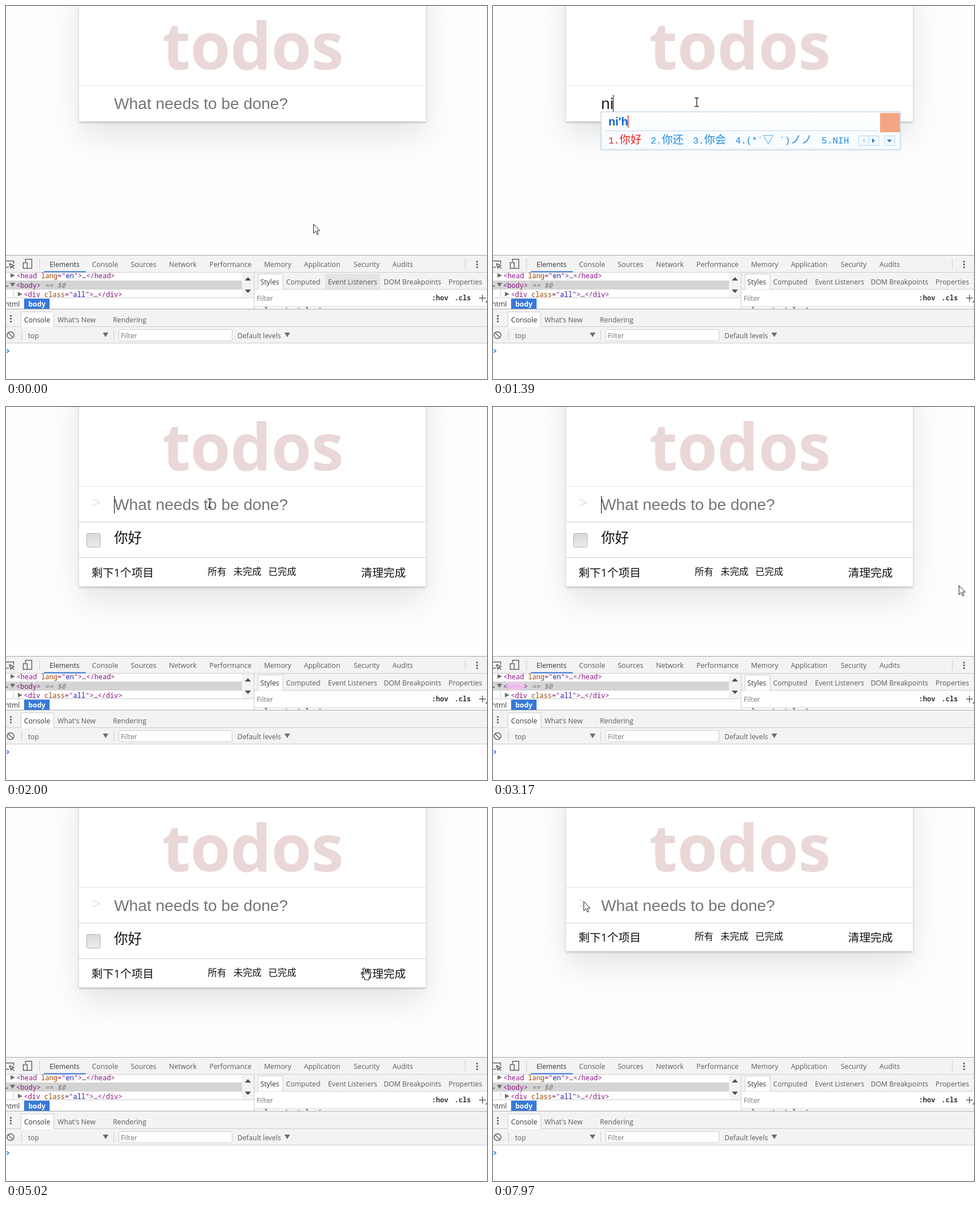
An HTML page for the animation above (8000 ms loop, 850 by 659 pixels).

```html
<!DOCTYPE html>
<html lang="en">
<head>
<meta charset="utf-8">
<title>todos</title>
<style>
  html, body { margin: 0; width: 850px; height: 659px; overflow: hidden; background: #fefefe; }
  svg { position: absolute; left: 0; top: 0; }
  text { white-space: pre; }
  .card {
    position: absolute; left: 129px; top: -60px; width: 613px; background: #fff;
    box-shadow: 0 2px 4px rgba(0,0,0,.22), 0 27px 55px rgba(0,0,0,.1);
  }
  .title { font: bold 115px "Open Sans", "Noto Sans", sans-serif; letter-spacing: -.4px; fill: #ead7d7; }
  .input { font: 28.2px "Liberation Sans", Arial, "Noto Sans CJK SC", sans-serif; fill: #222; }
  .hint { fill: #757575; }
  .cjk { font-family: "Open Sans", "Noto Sans CJK SC", "Noto Sans CJK JP", sans-serif; fill: #111; }
  .item { font-size: 24.6px; }
  .foot { font-size: 19.8px; }
  .nav { font-size: 16.5px; }
  .done { fill: #6a6a6a; text-decoration: line-through; }
  .line { fill: #e4e4e4; }
  .ui { font: 12.3px "Open Sans", "Noto Sans", sans-serif; fill: #5a5a5a; }
  .dark { fill: #333; }
  .soft { fill: #777; }
  .code { font: 12.08px "Noto Sans Mono", "DejaVu Sans Mono", monospace; }
  .tag { fill: #881280; }
  .attr { fill: #994500; }
  .val { fill: #1a1aa6; }
  .bar { fill: #f3f3f3; }
  .rule { fill: #ccc; }
  .ico { fill: none; stroke: #5f5f5f; stroke-width: 1.5; }
  .mark { fill: #6e6e6e; }
  .typed { font: bold 20px "Liberation Sans", Arial, sans-serif; fill: #0a66c8; }
  .pick { font: 16.2px "Liberation Mono", monospace; fill: #1f8be0; }
  .pick.first { fill: #e8201c; }
  .pick .han { font: 300 19.4px "Noto Sans CJK SC", "Noto Sans CJK JP", sans-serif; }
  .btn { fill: #f4faff; stroke: #b9d3ea; }
</style>
</head>
<body>
<div class="card" id="card"></div>
<svg width="850" height="659" viewBox="0 0 850 659">
  <defs>
    <linearGradient id="box" x2="0" y2="1"><stop stop-color="#d9d9d9"/><stop offset="1" stop-color="#ececec"/></linearGradient>
    <linearGradient id="pop" x2="0" y2="1"><stop stop-color="#fff"/><stop offset="1" stop-color="#f5fbff"/></linearGradient>
    <clipPath id="tree"><path d="M0 471h417v43H0z"/></clipPath>
    <clipPath id="styles"><path d="M439 500h411v35H439z"/></clipPath>
  </defs>

  <!-- page -->
  <text class="title" x="276" y="112">todos</text>
  <rect class="line" x="129" y="140" width="613" height="1"/>
  <text class="input hint" x="191" y="182" data-on="0-1160 2000-8000">What needs to be done?</text>
  <g data-on="2000-8000">
    <text class="input" x="151" y="178" style="fill:#e3e3e3">&gt;</text>
    <rect class="line" x="129" y="203" width="613" height="1"/>
  </g>
  <g data-on="2000-7210">
    <path class="line" d="M129 202h613v1H129zM129 265h613v1H129z"/>
    <rect x="142.500" y="223.500" width="24" height="24" rx="2" fill="url(#box)" stroke="#b8b0a6"/>
    <text class="cjk item" x="191" y="240" data-on="0-6500">你好</text>
    <g data-on="6500-8000">
      <text class="cjk item done" x="191" y="240">你好</text>
      <path d="M147.500 236.500l4.500 5 9-12" fill="none" stroke="#363636" stroke-width="4.500"/>
    </g>
  </g>
  <text x="697" y="250" font-family="Liberation Sans, sans-serif" font-size="33" fill="#cc9a9a"
    data-on="3014-3091 4654-4885 5810-6653">×</text>
  <g id="footer" data-on="2000-8000">
    <rect class="line" x="129" y="266" width="613" height="1"/>
    <text class="cjk foot" x="151" y="300">剩下1个项目</text>
    <text class="cjk nav" y="297"><tspan x="356.500">所有</tspan><tspan x="402">未完成</tspan><tspan x="463.500">已完成</tspan></text>
    <text class="cjk foot" x="627.500" y="300">清理完成</text>
  </g>
  <rect x="191" y="157" width="1" height="31" data-on="460-1000 2000-2540 3070-3600 4090-4260"/>
  <g data-on="1680-2000">
    <text class="input" x="191" y="182">你好</text>
    <rect x="248" y="157" width="1" height="31"/>
  </g>
  <g id="ime"></g>

  <!-- developer tools: backgrounds -->
  <rect y="440" width="850" height="219" fill="#fff"/>
  <path class="bar" d="M0 441h850v29H0zM439 471h411v29H439zM0 536h850v59H0zM417 471h21v44H417z"/>
  <rect y="440" width="850" height="1" fill="#a5a5a5"/>
  <path class="rule" d="M0 470h850v1H0zM438 471h1v64h-1zM0 515h438v1H0zM439 500h411v1H439zM439 531h411v1H439zM0 566h850v1H0zM0 595h850v1H0zM59 446h1v19h-1zM811 446h1v19h-1zM27 572h1v19h-1zM190 572h1v19h-1z"/>
  <rect y="535" width="850" height="1" fill="#a9a9a9"/>
  <rect x="67" y="468.500" width="74" height="2" fill="#3879d9"/>

  <!-- main tabs -->
  <g class="ico">
    <path d="M0 450.500h13.500v5M0 461.500h5M6 455l8 3.500-3.500 1.500 4 4M6 455l2.500 8 2-3"/>
    <path d="M34.500 452v-4.500h11v16h-7M30.500 453.500h7v10h-7z"/>
    <circle cx="8" cy="581.500" r="6"/><path d="M4 577.500l8 8"/>
  </g>
  <text class="ui" y="461">
    <tspan class="dark" x="77">Elements</tspan><tspan x="152">Console</tspan><tspan x="220.500">Sources</tspan><tspan x="288">Network</tspan><tspan x="359.500">Performance</tspan><tspan x="456">Memory</tspan><tspan x="526.500">Application</tspan><tspan x="614.500">Security</tspan><tspan x="683">Audits</tspan>
  </text>
  <path class="mark" d="M831 450h3v3h-3zM831 455h3v3h-3zM831 460h3v3h-3zM7 546h3v3H7zM7 551h3v3H7zM7 556h3v3H7z"/>

  <!-- element tree -->
  <g class="code" clip-path="url(#tree)">
    <rect y="485" width="417" height="16" fill="#d4d4d4"/>
    <rect id="glow" x="26" y="485" width="28" height="15" fill="#d4d4d4"/>
    <path class="mark" d="M8 472l8 4-8 4zM7 489h9l-4.500 7zM21 505l8 4-8 4zM0 494h3v2H0z"/>
    <rect class="rule" x="13" y="502" width="1" height="13"/>
    <text class="tag" x="18.500" y="481">&lt;head <tspan class="attr">lang</tspan>="<tspan class="val">en</tspan>"&gt;<tspan class="dark">…</tspan>&lt;/head&gt;</text>
    <text class="tag" x="18" y="497.500">&lt;<tspan id="word">body</tspan>&gt;<tspan class="soft" font-style="italic"> == $0</tspan></text>
    <text class="tag" x="31.500" y="514">&lt;div <tspan class="attr">class</tspan>="<tspan class="val">all</tspan>"&gt;<tspan class="dark">…</tspan>&lt;/div&gt;</text>
  </g>
  <path d="M422 485l5.500-6 5.500 6zM422 501l5.500 6 5.500-6z" fill="#505050"/>
  <rect x="32" y="517" width="45" height="18" fill="#3879d9"/>
  <text class="ui dark" x="-2" y="531">html</text>
  <text class="ui" x="39.500" y="531" style="fill:#fff;font-weight:bold">body</text>

  <!-- styles pane -->
  <rect x="564" y="473" width="97" height="27" fill="#e5e5e5" data-on="0-70"/>
  <path d="M445.500 500.500v-27h44v27" fill="#fff" stroke="#ccc"/>
  <text class="ui" y="492">
    <tspan class="dark" x="449.500">Styles</tspan><tspan x="495">Computed</tspan><tspan x="569">Event Listeners</tspan><tspan x="667.500">DOM Breakpoints</tspan><tspan x="782">Properties</tspan>
  </text>
  <g clip-path="url(#styles)">
    <text class="ui soft" x="443" y="521">Filter</text>
    <text class="code dark" y="520" style="font-weight:bold"><tspan x="752.500">:hov</tspan><tspan x="792.500">.cls</tspan></text>
    <path class="ico" d="M836 516h12M842 510v12"/>
    <path class="mark" d="M850 520v4h-3z"/>
    <text class="code dark" x="449" y="542">element.style {</text>
  </g>

  <!-- console -->
  <path d="M26.500 567v-26.500h58V567" fill="#fff" stroke="#ccc"/>
  <text class="ui" y="559"><tspan class="dark" x="32">Console</tspan><tspan x="91">What's New</tspan><tspan x="189">Rendering</tspan></text>
  <rect x="199.500" y="571.500" width="200" height="20" rx="2" fill="#fff" stroke="#ccc"/>
  <text class="ui" y="587"><tspan x="39">top</tspan><tspan class="soft" x="203">Filter</tspan><tspan x="409">Default levels</tspan></text>
  <path class="mark" d="M171 577h10l-5 8zM492 577h10l-5 8z"/>
  <path d="M1.500 606.500l3.500 3-3.500 3" fill="none" stroke="#3b82ea" stroke-width="1.700"/>

  <!-- pointers -->
  <g id="pointer">
    <path data-kind="arrow" d="M.5.5v16l3.700-3.600 2.700 6 2.300-1-2.600-5.900h5z" fill="#fff" stroke="#222"/>
    <path data-kind="beam" d="M-3.500-7.500h2.500l1 1 1-1h2.500M-3.500 7.500h2.500l1-1 1 1h2.500M0-6.500v13" fill="none" stroke="#222" stroke-width="1.300"/>
    <path data-kind="hand" d="M-1.500 13V2q1.500-3 3 0v6q1.500-2 3 0 1.500-1.500 3 .5 2-1 3 1v5.500l-2 3.500v3h-8v-3l-6-8q0-2.500 2-1.500z M1.500 7v5M4.500 8v4M7.500 9v3" fill="#fff" stroke="#222" stroke-width="1.100"/>
  </g>
</svg>

<script>
const LOOP = 8000;
const $ = id => document.getElementById(id);

// Input method popup: each candidate is numbered, full-width glyphs take two cells.
const CELL = 9.72;
const isWide = c => c > '\u2000';

function candidates(list) {
  let x = 204;
  return list.map((word, i) => {
    let out = `<text class="pick${i ? '' : ' first'}" y="243">`;
    for (const c of `${i + 1}.${word}`) {
      out += `<tspan x="${x.toFixed(1)}"${isWide(c) ? ' class="han"' : ''}>${c}</tspan>`;
      x += CELL * (isWide(c) ? 2 : 1);
    }
    x += 16.4;
    return out + '</text>';
  }).join('');
}

function popup(from, to, text, caret, typed, typedEnd, r, list) {
  return `<g data-on="${from}-${to}">
    <text class="input" x="191" y="182">${text}</text>
    <rect x="${caret}" y="157" width="1" height="31"/>
    <rect x="191" y="187" width="${r - 191}" height="67" fill="url(#pop)" stroke="#a8c4dc"/>
    <rect x="198" y="220" width="${r - 238}" height="1" fill="#c6d5e4"/>
    <text class="typed" x="204" y="211">${typed}</text>
    <rect x="${typedEnd}" y="193" width="1.5" height="22" fill="#e8302c"/>
    ${candidates(list)}
    <path class="btn" d="M${r - 74} 229.500h36v17h-36zM${r - 56} 229.500v17M${r - 28} 229.500h18v17h-18z"/>
    <path d="M${r - 63} 234v8l-4-4z" fill="#b8d2ea"/>
    <path d="M${r - 50} 234v8l5-4zM${r - 24} 236h9l-4.500 5z" fill="#1f7fd0"/>
    <rect x="${r - 36}" y="189" width="35" height="34" fill="#f5a583"/>
  </g>`;
}

const longer = ['你好', '你好啊', '你好吗', '你好呀', '你好美'];
$('ime').innerHTML =
  popup(1160, 1310, 'n', 206, 'n', 217, 553, ['你', '那', '呢', '年', '能']) +
  popup(1310, 1390, 'ni', 212, 'ni', 223, 553, ['你', '您', '尼', '泥', '拟']) +
  popup(1390, 1470, 'ni', 212, "ni'h", 238, 720, ['你好', '你还', '你会', '(*´▽ `)ノノ', 'NIH']) +
  popup(1470, 1540, "ni'h", 233, "ni'ha", 250, 730, longer) +
  popup(1540, 1680, "ni'hao", 265, "ni'hao", 262, 730, longer);

// Pointer strokes: start time, interval, then one stop per interval.
const strokes = [
  [0, 70, 'arrow 543 385', 'arrow 480 300', 'arrow 405 215', 'beam 360 170'],
  [2860, 77, 'beam 420 172', 'beam 560 188', 'arrow 690 240', 'arrow 780 290', 'arrow 823 315',
    'arrow 838 322', 'arrow 840 322', 'arrow 812 318', 'arrow 770 312', 'arrow 725 302', 'hand 697 294'],
  [3860, 80, 'hand 698 294', 'hand 698 293'],
  [4500, 77, 'hand 690 290', 'hand 676 286', 'arrow 650 258', 'arrow 615 250', 'arrow 585 255', 'arrow 567 275'],
  [4950, 69, 'arrow 600 290', 'hand 633 282'],
  [5110, 80, 'hand 645 285', 'hand 652 287', 'hand 653 288'],
  [5420, 75, 'hand 654 288'],
  [5810, 75, 'arrow 470 260', 'arrow 290 250', 'arrow 180 240'],
  [6110, 80, 'arrow 170 237', 'arrow 160 236', 'arrow 154 235', 'arrow 152 234'],
  [6577, 76, 'arrow 250 255', 'arrow 450 292', 'arrow 588 313'],
  [6820, 73, 'arrow 620 308', 'hand 645 297', 'hand 650 294', 'hand 651 293'],
  [7420, 78, 'arrow 620 280', 'arrow 530 240', 'arrow 440 210', 'beam 360 185',
    'beam 280 170', 'beam 215 164', 'arrow 175 165', 'arrow 160 165']
];

function pointerAt(t) {
  const [start, gap, ...stops] = strokes.findLast(s => s[0] <= t);
  return stops[Math.min(stops.length - 1, Math.floor((t - start) / gap))].split(' ');
}

// Highlight of the changed tag, scrubbed by time.
function scrubbed(id, ...fills) {
  const a = $(id).animate(
    [{ fill: fills[0] }, { fill: fills[1], offset: .8 }, { fill: fills[2] }], { duration: 1400 });
  a.pause();
  return a;
}
const flash = [
  scrubbed('glow', 'rgb(158,54,153)', 'rgb(245,219,244)', '#d4d4d4'),
  scrubbed('word', '#fff', '#e39bdc', '#881280')
];

const timed = [...document.querySelectorAll('[data-on]')].map(el => ({
  el, spans: el.dataset.on.split(' ').map(s => s.split('-').map(Number))
}));
const shapes = [...document.querySelectorAll('[data-kind]')];
const show = (el, on) => { el.style.display = on ? '' : 'none'; };

function draw(t) {
  for (const { el, spans } of timed) show(el, spans.some(([a, b]) => t >= a && t < b));

  const bottom = t < 2000 ? 204 : t < 7210 ? 317 : 253;
  $('card').style.height = bottom + 60 + 'px';
  $('footer').setAttribute('transform', `translate(0 ${t < 7210 ? 0 : -64})`);

  const [kind, x, y] = pointerAt(t);
  $('pointer').setAttribute('transform', `translate(${x} ${y})`);
  for (const s of shapes) show(s, s.dataset.kind === kind);

  const age = t - 2150;
  for (const a of flash) a.currentTime = age < 0 ? 1400 : Math.min(age, 1400);
}

let begin;
function tick(now) {
  begin ??= now;
  draw((now - begin) % LOOP);
  requestAnimationFrame(tick);
}
draw(0);
requestAnimationFrame(tick);
</script>
</body>
</html>
```
